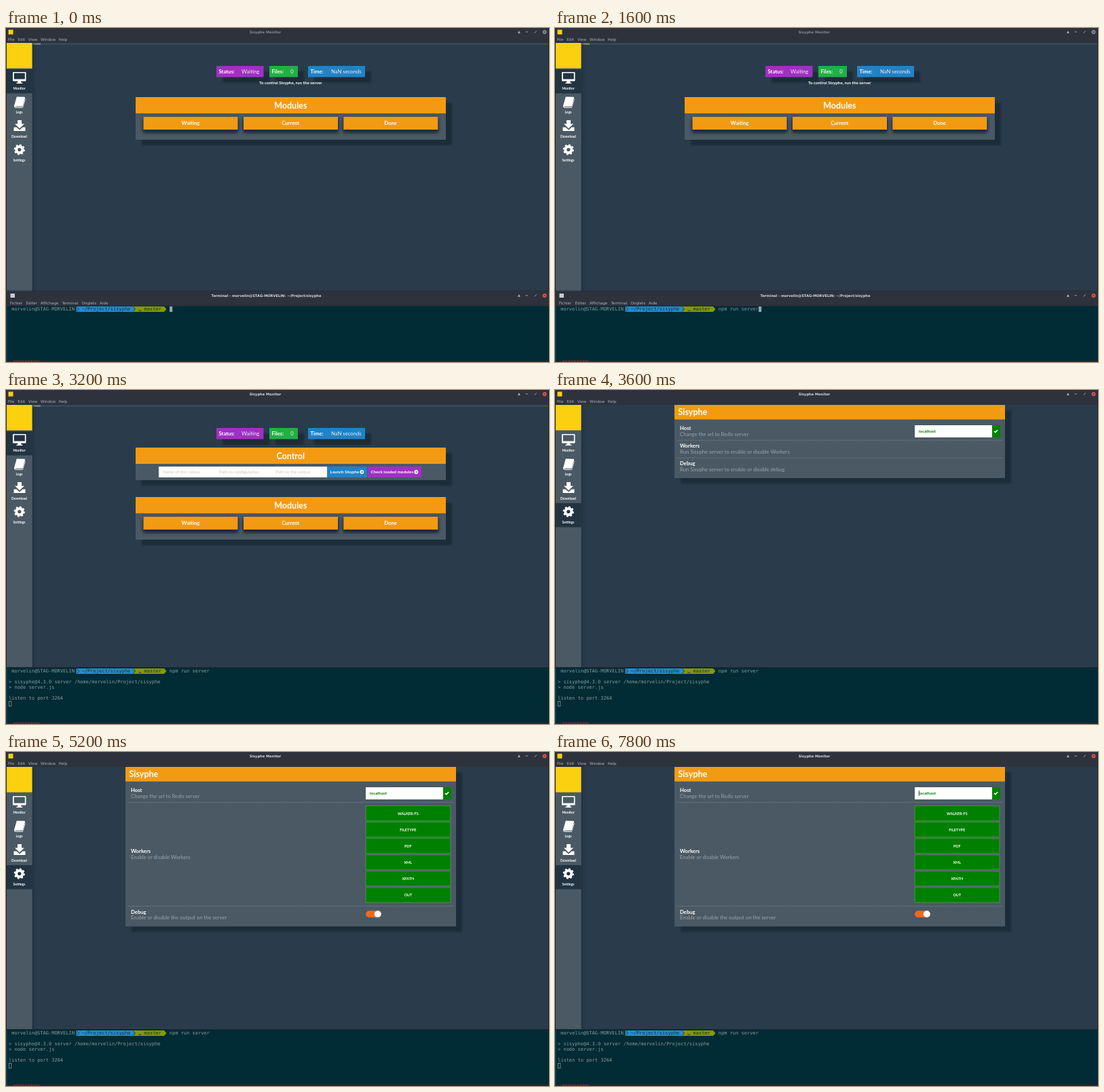
An HTML page for the animation above (8 s loop, 800 by 493 pixels).

```html
<!DOCTYPE html>
<html lang="en">
<head>
<meta charset="utf-8">
<title>Sisyphe Monitor</title>
<style>
html, body { margin: 0; width: 100%; height: 100%; overflow: hidden; background: #2a3c4c; }
svg { display: block; width: 100vw; height: 100vh; }
text { white-space: pre; }

/* Type */
.app { font: 7.7px Lato, sans-serif; fill: #fff; }
.bold { font-weight: 700; }
.heading { font-size: 12.5px; font-weight: 700; }
.small { font-size: 6.25px; font-weight: 700; }
.tiny { font-size: 5px; font-weight: 700; }
.caps { font-size: 5.5px; font-weight: 700; }
.mid { text-anchor: middle; }
.hint { fill: #9aa3aa; }
.placeholder { font-size: 6.4px; fill: #c3c3c0; }
.menu { font: 5.6px "DejaVu Sans", sans-serif; fill: #adb3bb; }
.title { font: bold 5.1px "DejaVu Sans", sans-serif; text-anchor: middle; fill: #d3d7de; }
.mono { font: 7px "DejaVu Sans Mono", monospace; fill: #8b9c9b; }

/* Surfaces */
.bar { fill: #2d323d; }
.panel { fill: #4a5964; }
.orange { fill: #f39a13; }
.blue { fill: #2082c8; }
.purple { fill: #a030c4; }
.green { fill: #22b043; }
.leaf { fill: #008000; }
.selected { fill: #223342; }
.term { fill: #012b35; }
.shadow { filter: drop-shadow(9.5px 8px 1.5px #1c2c39); }
.lift { filter: drop-shadow(0 4px 2px #1f2d39) drop-shadow(0 0 1px #1f2d39); }
.rule { stroke: #82909a; stroke-width: .7; stroke-dasharray: 1.5 1; }

/* Timeline: one 8 s loop */
.typing, .shell, .run, .listen, .offline, .control, .modules, .monitor,
.settings, .loading, .loaded, .unfocused, .focused, .caret {
  animation: 8s step-end infinite;
}
.typing { animation-name: type, shell; animation-timing-function: linear, step-end; }
.shell { animation-name: shell; }
.run { animation-name: run; }
.listen { animation-name: listen; }
.offline { animation-name: offline; }
.control { animation-name: listen; }
.modules { animation-name: drop; }
.unfocused { animation-name: unfocused; }
.focused { animation-name: focused; }
.monitor { animation-name: monitor; }
.settings { animation-name: settings; }
.loading { animation-name: loading; }
.loaded { animation-name: loaded; }
.caret { animation-name: caret; }
@keyframes type {
  0% { transform: translateX(0); animation-timing-function: steps(7, end); }
  17.5%, 100% { transform: translateX(59px); }
}
@keyframes shell { 0% { opacity: 1 } 22.5%, 100% { opacity: 0 } }
@keyframes run { 0% { opacity: 0 } 22.5%, 100% { opacity: 1 } }
@keyframes offline { 0% { opacity: 1 } 27.5%, 100% { opacity: 0 } }
@keyframes listen { 0% { opacity: 0 } 27.5%, 100% { opacity: 1 } }
@keyframes drop { 0% { transform: none } 27.5%, 100% { transform: translateY(56px) } }
@keyframes unfocused { 0% { opacity: 1 } 37.5%, 100% { opacity: 0 } }
@keyframes focused { 0% { opacity: 0 } 37.5%, 100% { opacity: 1 } }
@keyframes monitor { 0% { opacity: 1 } 42.5%, 100% { opacity: 0 } }
@keyframes settings { 0% { opacity: 0 } 42.5%, 100% { opacity: 1 } }
@keyframes loading { 0% { opacity: 1 } 47.5%, 100% { opacity: 0 } }
@keyframes loaded { 0% { opacity: 0 } 47.5%, 100% { opacity: 1 } }
@keyframes caret { 0% { opacity: 0 } 95%, 100% { opacity: 1 } }
</style>
</head>
<body>
<svg viewBox="0 0 800 493" preserveAspectRatio="none">
  <defs>
    <g id="controls">
      <path d="M753.8 7.8 755.8 4l2 3.8z" fill="#a9afb8"/>
      <path d="M765.5 5.8h3.4M778.5 7.6l3.2-3.4" stroke="#a9afb8" stroke-width=".9"/>
      <circle cx="793.5" cy="6" r="3" fill="currentColor"/>
      <path d="m792.3 4.8 2.4 2.4m0-2.4-2.4 2.4" stroke="#2d323d" stroke-width=".8"/>
    </g>
    <g id="go">
      <circle r="2.9" fill="#fff"/>
      <path d="M-1.6 0h3M.1-1.4 1.5 0 .1 1.4" fill="none" stroke="#33509c" stroke-width=".8"/>
    </g>
    <g id="worker">
      <rect x="530" width="125" height="22" class="leaf" stroke="#5c9a5f" stroke-width=".7"/>
    </g>
  </defs>

  <!-- Monitor window -->
  <rect width="800" height="493" fill="#2a3c4c"/>
  <rect width="800" height="22" class="bar"/>
  <rect x="3.5" y="2.5" width="7" height="7" fill="#f6cf12"/>
  <g class="unfocused">
    <text x="382" y="7.8" class="title" style="fill:#858b95">Sisyphe Monitor</text>
    <use href="#controls" color="#868c95"/>
  </g>
  <g class="focused">
    <text x="382" y="7.8" class="title">Sisyphe Monitor</text>
    <use href="#controls" color="#e2574f"/>
  </g>
  <g class="menu">
    <text x="3" y="18.7">File</text><text x="17.3" y="18.7">Edit</text>
    <text x="33" y="18.7">View</text><text x="51" y="18.7">Window</text>
    <text x="77.5" y="18.7">Help</text>
  </g>

  <g class="monitor app">
    <path d="M39 23.5h761" stroke="#3c4d5b" stroke-width="2"/>
    <path d="M39 23.5h12" stroke="#84919b" stroke-width="2"/>
    <g class="shadow">
      <rect x="310" y="56" width="69.5" height="16.5" class="purple"/>
      <rect x="388" y="56" width="42" height="16.5" class="green"/>
      <rect x="445" y="56" width="84" height="16.5" class="blue"/>
    </g>
    <g class="bold">
      <text x="313.5" y="66.8">Status:</text><text x="391.5" y="66.8">Files:</text>
      <text x="448.5" y="66.8">Time:</text>
    </g>
    <g fill="#eee">
      <text x="347" y="66.8">Waiting</text><text x="419.3" y="66.8">0</text>
      <text x="479" y="66.8">NaN seconds</text>
    </g>
    <text x="419.3" y="83.3" class="small mid offline">To control Sisyphe, run the server</text>

    <g class="control">
      <g class="shadow">
        <rect x="191" y="85" width="457" height="48" class="panel"/>
        <rect x="191" y="85" width="457" height="24" class="orange"/>
      </g>
      <text x="419.3" y="102" class="heading mid">Control</text>
      <rect x="225" y="113" width="248" height="16" fill="#fff"/>
      <g class="placeholder">
        <text x="231" y="123.2">Name of the corpus</text>
        <text x="314" y="123.2">Path to configuration</text>
        <text x="397" y="123.2">Path to the corpus</text>
      </g>
      <rect x="473" y="113" width="59" height="16" class="blue"/>
      <rect x="533" y="113" width="79" height="16" class="purple"/>
      <g class="small">
        <text x="477.5" y="123.2">Launch Sisyphe</text>
        <text x="537.5" y="123.2">Check loaded modules</text>
      </g>
      <use href="#go" x="524.3" y="121"/><use href="#go" x="604.3" y="121"/>
    </g>

    <g class="modules">
      <g class="shadow">
        <rect x="191" y="102" width="457" height="63" class="panel"/>
        <rect x="191" y="102" width="457" height="24" class="orange"/>
      </g>
      <text x="419.3" y="119" class="heading mid">Modules</text>
      <g class="lift orange">
        <rect x="202.5" y="131" width="139" height="19"/>
        <rect x="350" y="131" width="139" height="19"/>
        <rect x="497.3" y="131" width="139" height="19"/>
      </g>
      <g class="bold mid">
        <text x="272" y="143.2">Waiting</text><text x="419.3" y="143.2">Current</text>
        <text x="566.6" y="143.2">Done</text>
      </g>
    </g>
  </g>

  <g class="settings app">
    <g class="loading">
      <g class="shadow"><rect x="176" y="22" width="487" height="108" class="panel"/></g>
      <path d="M180 100.2h479" class="rule"/>
      <text x="184" y="85.2" class="bold">Workers</text>
      <text x="184" y="94" class="hint">Run Sisyphe server to enable or disable Workers</text>
      <text x="184" y="111" class="bold">Debug</text>
      <text x="184" y="119.8" class="hint">Run Sisyphe server to enable or disable debug</text>
    </g>
    <g class="loaded">
      <g class="shadow"><rect x="176" y="22" width="487" height="235.5" class="panel"/></g>
      <path d="M180 227.5h479" class="rule"/>
      <text x="184" y="149" class="bold">Workers</text>
      <text x="184" y="157.8" class="hint">Enable or disable Workers</text>
      <use href="#worker" y="79.5"/><use href="#worker" y="103.6"/>
      <use href="#worker" y="127.7"/><use href="#worker" y="151.8"/>
      <use href="#worker" y="175.9"/><use href="#worker" y="200"/>
      <g class="caps mid">
        <text x="592.3" y="92.5">WALKER-FS</text><text x="592.3" y="116.6">FILETYPE</text>
        <text x="592.3" y="140.7">PDF</text><text x="592.3" y="164.8">XML</text>
        <text x="592.3" y="188.9">XPATH</text><text x="592.3" y="213">OUT</text>
      </g>
      <text x="184" y="238.6" class="bold">Debug</text>
      <text x="184" y="247.4" class="hint">Enable or disable the output on the server</text>
      <rect x="530" y="234.2" width="22.5" height="10" rx="5" fill="#f2681a"/>
      <circle cx="547.8" cy="239.2" r="5" fill="#fff"/>
    </g>
    <rect x="176" y="22" width="487" height="21.5" class="orange"/>
    <text x="181.5" y="37.3" class="heading">Sisyphe</text>
    <path d="M180 74.2h479" class="rule"/>
    <text x="184" y="59" class="bold">Host</text>
    <text x="184" y="67.8" class="hint">Change the url to Redis server</text>
    <rect x="530" y="52" width="114" height="18" fill="#fff"/>
    <rect x="644" y="52" width="12" height="18" class="leaf"/>
    <path d="m647 60.8 1.8 1.8 3.4-3.6" fill="none" stroke="#fff" stroke-width="1.5"/>
    <text x="536" y="63.3" class="small" style="fill:#008000">localhost</text>
    <path d="M536.3 57v8" class="caret" stroke="#222" stroke-width=".8"/>
  </g>

  <!-- Sidebar -->
  <rect x="1" y="22" width="37.7" height="388" class="panel" style="filter:drop-shadow(2px 0 2px #1f2e3a)"/>
  <rect x="1" y="22" width="37.5" height="37.5" fill="#fbd10f"/>
  <rect x="1" y="61" width="37.7" height="35.5" class="selected monitor"/>
  <rect x="1" y="167" width="37.7" height="35.5" class="selected settings"/>
  <g fill="#fff">
    <path fill-rule="evenodd" d="M11 65h17.5q1 0 1 1v11.5q0 1-1 1H22l.6 2.2h1.7V82h-9v-1.3H17l.6-2.2H11q-1 0-1-1V66q0-1 1-1zm.8 1.6v8.8h16v-8.8z"/>
    <path d="m15.8 101.5 11.2.2q1.3.3 1 1.6l-3.2 11.4q-.5 1.2-1.8 1.2H13.8q-.6.8.4 1h10.2l3.8-12.4.4 1.2-3.4 11.1q-.5 1.2-1.7 1.2H14q-2.4-.8-2-3.3z"/>
    <path d="M17 136h6v5.5h4l-7 6.8-7-6.8h4zM11.5 146.5h4l4.5 4 4.5-4h4v5.4h-17z"/>
    <circle cx="19.8" cy="179.5" r="4.6" fill="none" stroke="#fff" stroke-width="4"/>
    <circle cx="19.8" cy="179.5" r="7.1" fill="none" stroke="#fff" stroke-width="2" stroke-dasharray="2.79"/>
  </g>
  <g class="app tiny mid">
    <text x="19.5" y="91.4">Monitor</text><text x="19.5" y="126.4">Logs</text>
    <text x="19.5" y="161.6">Download</text><text x="19.5" y="196.6">Settings</text>
  </g>
  <path d="M.5 0v410M799.5 0v410" stroke="#20262f"/>

  <!-- Terminal -->
  <rect y="409.5" width="800" height="84" class="term"/>
  <path d="M0 409.5h800" stroke="#1b2731"/>
  <path d="M1 411v82" stroke="#155068"/>
  <g class="mono">
    <text x="8.2" y="417.3">morvelin@STAG-MORVELIN</text>
    <path d="M103.5 411H187l3 4-3 4h-83.5z" fill="#268bd2"/>
    <path d="M187 411h46l3.5 4-3.5 4h-46l3-4z" fill="#859900"/>
    <path d="m105 412 2.5 3-2.5 3M188 412l2.5 3-2.5 3" fill="none" stroke="#0a3440" stroke-width=".8"/>
    <path d="M196 415.5v2h3m-1-1.2 1.2 1.2" fill="none" stroke="#0a3440" stroke-width=".7"/>
    <text x="111.7" y="417.3" style="fill:#0a3440">~/Project/sisyphe</text>
    <text x="203.5" y="417.3" style="fill:#0a3440">master</text>
    <text x="240.8" y="417.3">npm run server</text>
    <g class="typing">
      <rect x="240.5" y="410.5" width="64" height="9" class="term"/>
      <rect x="241" y="411" width="4.2" height="8" fill="#98a5a5"/>
    </g>
    <g class="run">
      <text x="4" y="433.3">> sisyphe@4.3.0 server /home/morvelin/Project/sisyphe</text>
      <text x="4" y="441.3">> node server.js</text>
    </g>
    <g class="listen">
      <text x="4" y="457.3">listen to port 3264</text>
      <rect x="4" y="459" width="4" height="8" fill="#98a5a5" class="unfocused"/>
      <rect x="4.3" y="459.3" width="3.6" height="7.4" fill="none" stroke="#98a5a5" stroke-width=".7" class="focused"/>
    </g>
  </g>
  <path d="M2 492h798" stroke="#6b2529" stroke-width=".8"/>
  <path d="M11 491.5h39" stroke="#b8322c" stroke-dasharray="3 1.2"/>

  <g class="unfocused">
    <rect y="389" width="800" height="21.5" class="bar" style="filter:drop-shadow(0 -1px 1px #1f2b37)"/>
    <rect x="6.5" y="392" width="6.5" height="6" fill="#c9cdd3"/>
    <text x="383.5" y="396.8" class="title shell">Terminal - morvelin@STAG-MORVELIN: ~/Project/sisyphe</text>
    <text x="383.5" y="396.8" class="title run">Terminal - npm run server</text>
    <use href="#controls" y="389" color="#e2574f"/>
    <g class="menu">
      <text x="6" y="407.7">Fichier</text><text x="29.5" y="407.7">Éditer</text>
      <text x="51" y="407.7">Affichage</text><text x="82.5" y="407.7">Terminal</text>
      <text x="111.5" y="407.7">Onglets</text><text x="138" y="407.7">Aide</text>
    </g>
  </g>
</svg>
</body>
</html>
```
